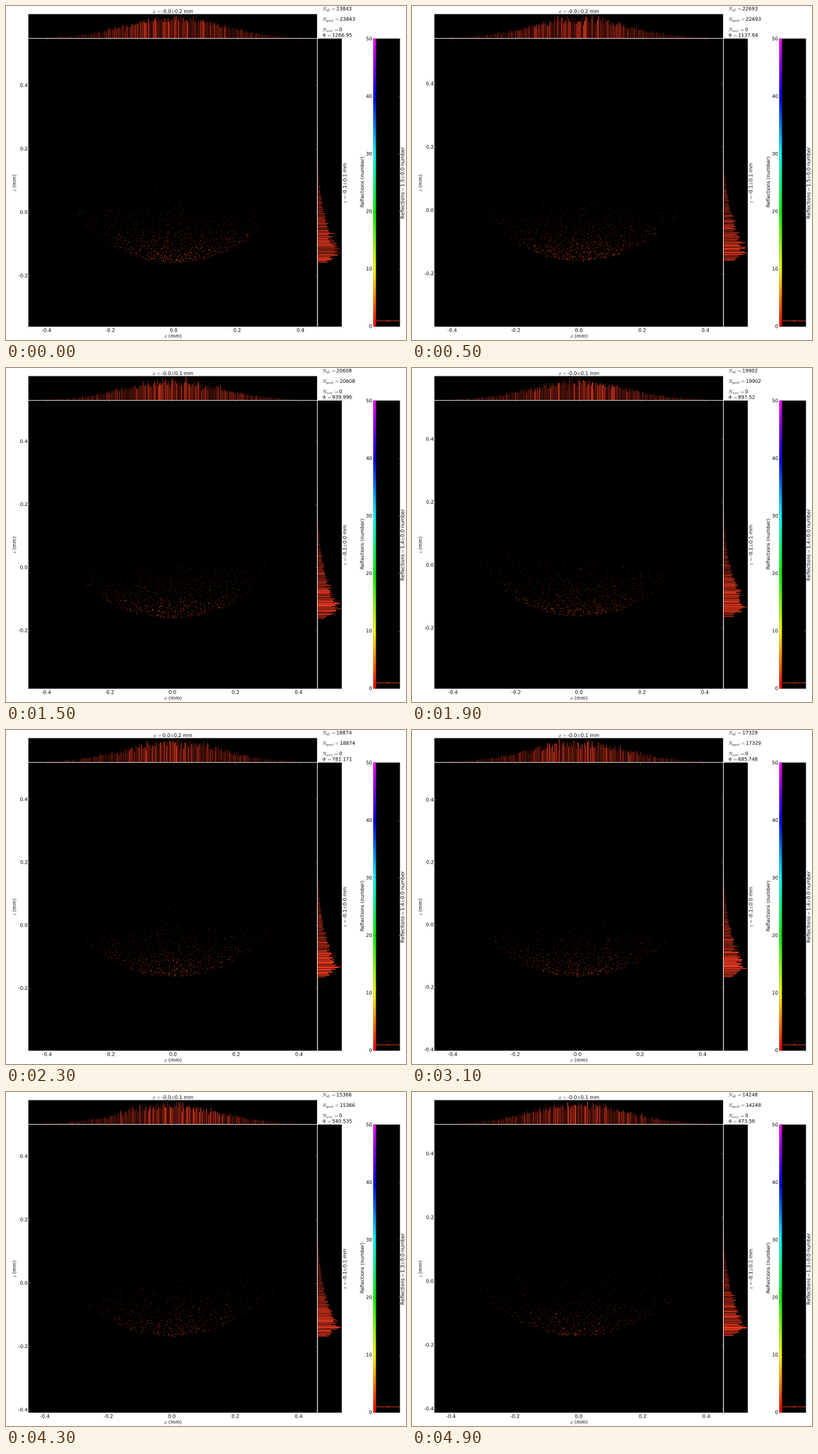
Recreate the animation shown at these times as a matplotlib script. Size 512 by 428 pixels, loop 5 s.

```python
import numpy as np
import matplotlib.pyplot as plt
from matplotlib.animation import FuncAnimation
from matplotlib.colors import hsv_to_rgb
from matplotlib.patches import PathPatch
from matplotlib.textpath import TextPath
from matplotlib.transforms import Affine2D

W, H, FRAMES, INTERVAL = 512, 428, 50, 100
LEFT, RIGHT, TOP, BOTTOM = 29, 398, 42, 411
SIDE, BASE = 399, 41
RED = np.array([0.90, 0.22, 0.12])
TICKS = [-0.4, -0.2, 0.0, 0.2, 0.4]
FONT_SIZE = 6.2

plt.rcParams.update({"font.family": "DejaVu Sans", "mathtext.fontset": "cm"})

# Readings over the run, interpolated between these steps
STEPS = [0, 11, 19, 23, 31, 37, 49]
COUNT = [23843, 21313, 19902, 18874, 17329, 16485, 14248]
FLUX = [1266.95, 982.473, 897.52, 781.171, 685.748, 607.51, 473.56]
ORIGIN_X = [214.5, 212.3, 213.7, 213.8, 212.0, 211.0, 213.3]
ORIGIN_Y = [264.0, 258.5, 252.2, 249.9, 249.2, 246.9, 242.2]
SCALE = [406.5, 404.2, 403.3, 403.2, 400.0, 403.6, 408.5]
DEPTH = [0.159, 0.160, 0.164, 0.164, 0.167, 0.168, 0.1725]
X_MEAN = ["-0.0", "-0.0", "-0.0", "0.0", "-0.0", "-0.0", "-0.0"]
X_WIDTH = ["0.2", "0.1", "0.1", "0.2", "0.1", "0.1", "0.1"]
Z_WIDTH = ["0.1", "0.0", "0.1", "0.0", "0.0", "0.1", "0.1"]


def reading(values, n):
    return float(np.interp(n, STEPS, values))


def cover(size, start, end):
    """Share of each pixel that lies between start and end."""
    cells = np.arange(size)
    return np.clip(np.minimum(cells + 1, end) - np.maximum(cells, start), 0, 1)


def fill(img, x0, y0, x1, y1, color):
    alpha = np.outer(cover(H, y0, y1), cover(W, x0, x1))[..., None]
    img[:] = img * (1 - alpha) + color * alpha


def make_backdrop():
    img = np.ones((H, W, 3))
    fill(img, 28.6, 41.7, 398.2, 410.9, 0)
    fill(img, 28.6, 10.4, 398.2, 40.8, 0)
    fill(img, 399.2, 41.7, 429.8, 410.9, 0)
    fill(img, 470.2, 41.7, 504.3, 410.9, 0)
    level = np.clip((410.9 - np.arange(H)) / 369, 0, 1)
    hsv = np.stack([level * 5 / 6, np.ones(H), np.ones(H)], -1)
    fill(img, 470.2, 41.7, 473.5, 410.9, hsv_to_rgb(hsv)[:, None])
    for k in range(1, 5):
        img[round(410.5 - k * 73.7), [473, 502, 503]] = 0.2
    img[403, 474:504] = RED * 0.75
    img[402:405, 489] = RED * 0.8
    img[395, 475:477] = RED * 0.2
    return img


BACKDROP = make_backdrop()


def draw_spot(img, rng, ox, floor, count):
    size = int(count / 7)
    dx = np.clip(rng.normal(0, 62, size), -160, 160)
    height = 170 - np.sqrt(170**2 - dx**2) + rng.exponential(34, size)
    col = np.round(ox + dx).astype(int)
    row = np.floor(floor - height).astype(int)
    keep = (col > LEFT) & (col < RIGHT - 1) & (row > TOP) & (row < BOTTOM)
    glow = (0.03 + rng.exponential(0.17, size)) * np.exp(-height / 65)
    tint = np.stack([np.ones(size), rng.uniform(0.2, 0.45, size),
                     rng.uniform(0.05, 0.18, size)], -1)
    np.add.at(img, (row[keep], col[keep]), (glow[:, None] * tint)[keep])


def bar_sizes(rng, profile, noise, longest):
    sizes = profile * rng.normal(1, noise, profile.size)
    return np.maximum(sizes * longest / sizes.max(), 0)


def draw_x_profile(img, rng, ox):
    cols = np.arange(LEFT, RIGHT)
    level = np.exp(-0.5 * ((cols - ox) / 62) ** 2)
    sizes = bar_sizes(rng, level, 0.14, 30)
    shades = rng.choice([0.25, 0.45, 0.8], cols.size, p=[0.4, 0.35, 0.25])
    for col, size, shade, lev in zip(cols, sizes, shades, level):
        full = int(size)
        color = RED * shade * (0.35 + 0.65 * lev)
        img[BASE - full:BASE, col] = color
        img[BASE - 1 - full, col] = color * (size - full)


def draw_z_profile(img, rng, floor):
    rows = np.arange(TOP, int(floor) + 1)
    u = floor - rows
    level = np.exp(-(u / 55) ** 1.5) * np.minimum(1, 0.4 + u / 20)
    sizes = bar_sizes(rng, level, 0.13, 29.5)
    sizes = np.maximum(sizes, 1.5 * np.exp(-(u / 125) ** 4))
    shades = rng.choice([0.5, 0.75, 1.0], rows.size, p=[0.35, 0.35, 0.3])
    for row, size, shade, lev in zip(rows, sizes, shades, level):
        full = int(size)
        color = RED * shade * (0.35 + 0.65 * min(1, lev * 1.3))
        img[row, SIDE:SIDE + full] = color
        img[row, SIDE + full] = color * (size - full)


def draw_ticks(img, ox, oy, scale):
    for v in TICKS:
        x, y = round(ox + v * scale), round(oy - v * scale)
        if LEFT <= x < RIGHT:
            img[[TOP, TOP + 1, BOTTOM - 2, BOTTOM - 1], x] = 0.2
        if TOP <= y < BOTTOM:
            img[y, [LEFT, LEFT + 1, RIGHT - 2, RIGHT - 1]] = 0.2


fig = plt.figure(figsize=(W / 100, H / 100), dpi=100, facecolor="white")
ax = fig.add_axes([0, 0, 1, 1])
ax.axis("off")
picture = ax.imshow(BACKDROP, extent=(0, W, H, 0), interpolation="nearest",
                    aspect="auto")
ax.set(xlim=(0, W), ylim=(H, 0))


class Label:
    """Text as outlines, so small type keeps its exact spacing."""

    def __init__(self, x, y, text="", align=0.5, angle=0):
        self.x, self.y, self.align, self.angle = x, y, align, angle
        self.patch = PathPatch(TextPath((0, 0), "0"), fc="black", lw=0, zorder=3)
        ax.add_patch(self.patch)
        if text:
            self.set_text(text)

    def set_text(self, text):
        self.path = TextPath((0, 0), text, size=FONT_SIZE)
        self.move(self.x, self.y)

    def move(self, x, y, visible=True):
        shift = 0
        if self.align:
            box = self.path.get_extents()
            shift = box.x0 + self.align * box.width
        place = (Affine2D().translate(-shift, 0).scale(1, -1)
                 .rotate_deg(-self.angle).translate(x, y))
        self.patch.set_path(place.transform_path(self.path))
        self.patch.set_visible(visible)


Label(213.5, 425, "$x$ (mm)")
Label(12.7, 227, "$z$ (mm)", angle=90)
Label(458, 225.5, "Reflections (number)", angle=90)
for k in range(6):
    Label(468.3, 412.6 - k * 73.7, str(10 * k), align=1)

x_title = Label(213.5, 9)
z_title = Label(435.7, 227, angle=90)
bounce_title = Label(509.7, 226.5, angle=90)
info = [Label(405, y, align=0) for y in (5.6, 19, 32.3, 39.5)]
x_labels = [Label(0, 0, f"{v:.1f}") for v in TICKS]
y_labels = [Label(0, 0, f"{v:.1f}", align=1) for v in TICKS]


def update(n):
    rng = np.random.default_rng(100 + n)
    ox, oy = reading(ORIGIN_X, n), reading(ORIGIN_Y, n)
    scale = reading(SCALE, n)
    floor = oy + reading(DEPTH, n) * scale
    count = round(reading(COUNT, n))
    near = int(np.argmin([abs(n - s) for s in STEPS]))

    img = BACKDROP.copy()
    draw_spot(img, rng, ox, floor, count)
    draw_x_profile(img, rng, ox)
    draw_z_profile(img, rng, floor)
    draw_ticks(img, ox, oy, scale)
    picture.set_data(np.clip(img, 0, 1))

    for v, x_label, y_label in zip(TICKS, x_labels, y_labels):
        x, y = ox + v * scale, oy - v * scale
        x_label.move(x, 417.6, LEFT <= x <= RIGHT)
        y_label.move(27.3, y + 2.3, TOP <= y <= BOTTOM - 0.5)

    x_title.set_text(rf"$x\,{{=}}${X_MEAN[near]}${{\pm}}${X_WIDTH[near]} mm")
    z_title.set_text(rf"$z\,{{=}}$-0.1${{\pm}}${Z_WIDTH[near]} mm")
    bounces = 1.5 if n < 7 else 1.4 if n < 34 else 1.3
    bounce_title.set_text(rf"Reflections${{=}}${bounces}${{\pm}}$0.0 number")
    lines = [rf"$N_{{\rm all}}\,{{=}}${count}",
             rf"$N_{{\rm good}}\,{{=}}${count}",
             r"$N_{\rm over}\,{=}$0",
             rf"$\Phi\,{{=}}${reading(FLUX, n):.6g}"]
    for item, text in zip(info, lines):
        item.set_text(text)
    return []


anim = FuncAnimation(fig, update, frames=FRAMES, interval=INTERVAL,
                     repeat=True, repeat_delay=0, blit=False)
plt.show()
```
